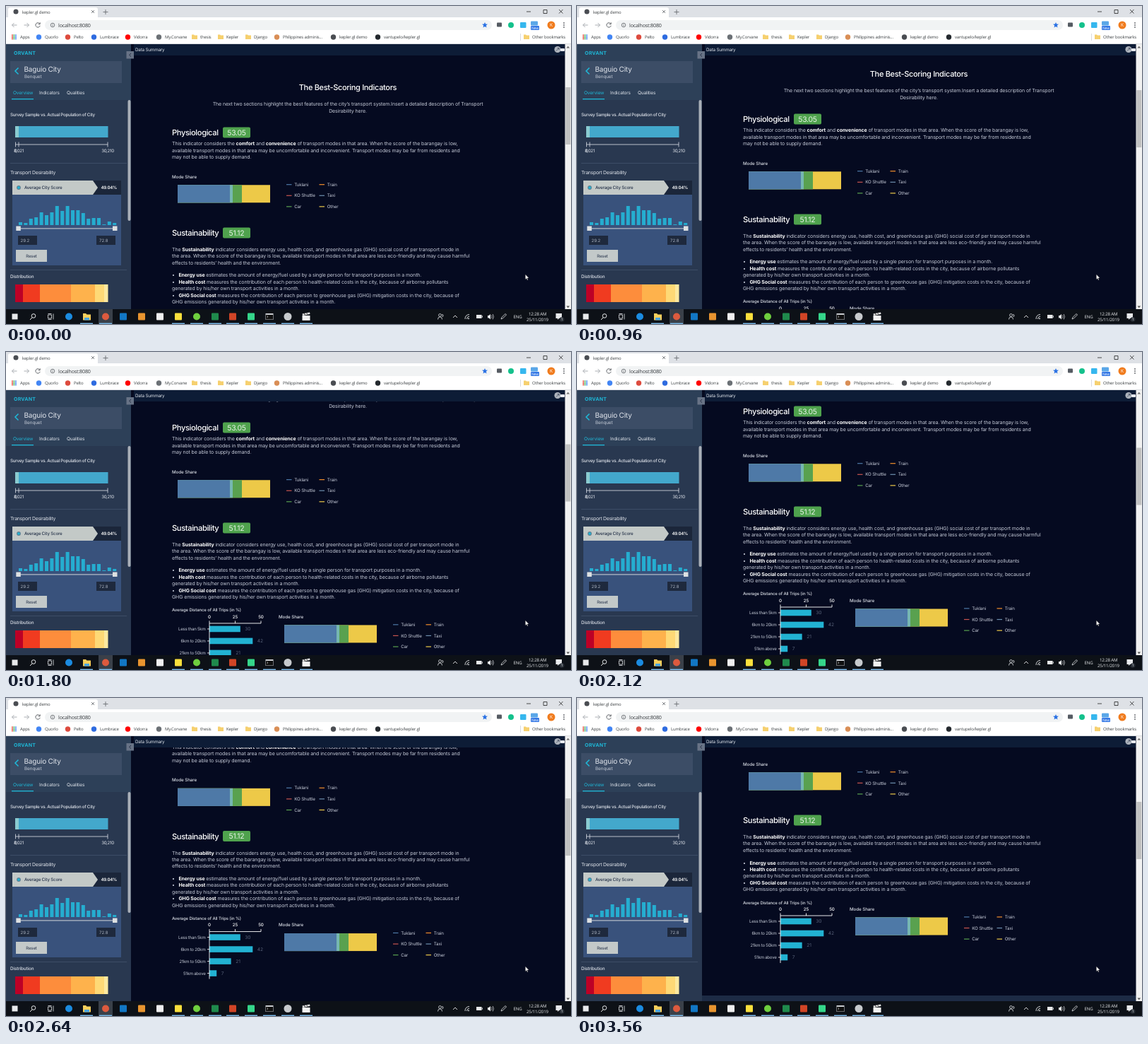
Animation of 800 by 450 pixels, one loop 3.6 s. Source, as an HTML page:

```html
<!DOCTYPE html>
<html lang="en">
<head>
<meta charset="utf-8">
<title>Transport dashboard</title>
<style>
@property --s { syntax: "<number>"; inherits: true; initial-value: 0; }
html, body { margin: 0; width: 100%; height: 100%; overflow: hidden; background: #fff; }
svg { display: block; }
#stage { width: 800px; height: 450px; animation: scroll 3600ms linear infinite; }
#page { transform: translateY(calc(var(--s) * -1px)); }
#thumb { transform: translateY(calc(var(--s) * .216px)); }
text { font-family: Inter, sans-serif; text-rendering: geometricPrecision; white-space: pre; }
.ui { font-family: "Open Sans", "Noto Sans", sans-serif; }
.b { font-weight: 700; fill: #fff; }
@keyframes scroll {
  0% { --s: 0; }
  26.67% { --s: 19; }
  31.1% { --s: 21.5; }
  37.78% { --s: 54.5; }
  50% { --s: 72; }
  66.67% { --s: 115; }
  83.33% { --s: 141; }
  93.3%, 100% { --s: 148; }
}
</style>
</head>
<body>
<svg id="stage" viewBox="0 0 800 450" xmlns="http://www.w3.org/2000/svg"></svg>
<script>
const rect = (x, y, w, h, fill, r = 0) =>
  `<rect x="${x}" y="${y}" width="${w}" height="${h}" fill="${fill}" rx="${r}"/>`;
const dot = (x, y, r, fill) => `<circle cx="${x}" cy="${y}" r="${r}" fill="${fill}"/>`;
const line = (d, color, w = 1) => `<path d="${d}" fill="none" stroke="${color}" stroke-width="${w}"/>`;
const shape = (d, fill) => `<path d="${d}" fill="${fill}"/>`;
const text = (x, y, str, size, fill, { ls = 0, wt = 400, at = 'start', cls = '' } = {}) =>
  `<text x="${x}" y="${y}" font-size="${size}" fill="${fill}" letter-spacing="${ls}" font-weight="${wt}" text-anchor="${at}" class="${cls}">${str}</text>`;
const ui = (x, y, str, fill = '#3c4043', size = 6, ls = -.15) => text(x, y, str, size, fill, { ls, cls: 'ui' });
const folder = (x, y, fill = '#f6d06f') => shape(`M${x - 4} ${y - 3}h3l1 1h4v5.500h-8z`, fill);

const BLUE = '#4e79a7', TEAL = '#76b7b2', GREEN = '#59a14f', YELLOW = '#edc948';
const CYAN = '#1fb6d6', PALE = '#dfe3ea';

function browser() {
  const dim = '#a9adb2', grey = '#5f6368';
  let s = rect(0, 0, 800, 16, '#dee1e6') + rect(3, 2, 127, 16, '#fff', 3) + rect(0, 16, 800, 38, '#fff')
    + dot(14, 8, 3.5, '#4a4d52') + ui(23, 10.5, 'kepler.gl demo')
    + line('M121 6l4 4m0-4l-4 4', grey, .8) + line('M141 5v7m-3.500-3.500h7', grey, .8)
    + line('M737 8h6', '#222', .8) + line('M761 5.500h5v5h-5z', '#222', .8) + line('M783 5l5.500 5.500m0-5.500l-5.500 5.500', '#222', .8);
  s += line('M15.500 27h-7m3-3l-3 3l3 3', dim) + line('M25.500 27h7m-3-3l3 3l-3 3', dim)
    + line('M47.800 25.200a3.200 3.200 0 1 0 .4 2.600m0-4.500v2.400h-2.400', grey)
    + rect(55, 20, 633, 14, '#f1f3f4', 7) + `<circle cx="66" cy="27" r="2.800" fill="none" stroke="${grey}" stroke-width=".8"/>`
    + line('M66 26.500v2m0-3.200v.6', grey, .8) + ui(74, 29.5, 'localhost:8080', '#303438', 7.1)
    + shape('M678 23l1.100 2.600 2.900.2-2.200 1.800.7 2.800-2.500-1.500-2.500 1.500.7-2.800-2.200-1.800 2.900-.2z', '#2b72e4')
    + rect(695, 23.5, 7, 6, '#555b62', 1) + dot(715, 27, 4, '#14c18c') + rect(728, 23, 8.5, 8, '#36b7ee', 1)
    + rect(743, 21.5, 10, 6, '#5aa7e8', 1) + rect(743, 28, 12, 6, '#3478e5', 1) + ui(744, 33, 'New', '#fff', 5)
    + dot(772, 27, 5.5, '#f07b1d') + text(772, 29.4, 'K', 6.5, '#fff', { at: 'middle', cls: 'ui' })
    + [24, 27, 30].map(y => dot(790, y, .9, grey)).join('');
  for (let i = 0; i < 9; i++)
    s += rect(8 + i % 3 * 2.5, 40.5 + (i / 3 | 0) * 2.5, 1.8, 1.8, ['#ea4335', '#34a853', '#4285f4'][i % 3]);
  const marks = [
    [20, 'Apps'], [55, 'Quorlo', '#4285f4'], [96, 'Pelto', '#dd4b3e'], [133, 'Lumbrace', '#2e6be0'],
    [181, 'Vidorra', '#f00'], [225, 'My.Corvane', '#6b7075'], [275, 'thesis', 0], [312, 'Kepler', 0],
    [351, 'Django', 0], [392, 'Philippines adminis...', '#d98e56'], [472, 'kepler.gl demo', '#4a4d52'],
    [535, 'vantupelo/kepler.gl', '#24292e'], [745, 'Other bookmarks', 0]
  ];
  for (const [x, name, color] of marks)
    s += ui(x, 46.2, name) + (color ? dot(x - 8.5, 44, 3.7, color) : color === 0 ? folder(x - 8, 43.5) : '');
  return s + line('M728.500 39v10', '#c9ccd0', .7) + rect(0, 53, 800, 1, '#dadce0');
}

function sidebar() {
  let s = rect(0, 54, 177, 79, '#2d4058') + rect(0, 133, 177, 296, '#293850')
    + text(11, 68.6, 'ORVANT', 7, CYAN, { wt: 700, ls: .25 })
    + rect(6, 78, 158, 31, '#3c4d66') + line('M17.500 87.500l-4.500 4.500l4.500 4.500', CYAN, 1.6)
    + text(25.5, 93, 'Baguio City', 10, PALE, { ls: -.2 }) + text(26, 102, 'Benquet', 6.4, '#c4cbd6', { ls: -.1 })
    + text(10, 124.7, 'Overview', 6.5, CYAN, { ls: -.1 }) + text(47, 124.7, 'Indicators', 6.5, PALE, { ls: -.15 })
    + text(86, 124.7, 'Qualities', 6.5, PALE, { ls: -.15 }) + rect(8, 131, 31, 1.3, CYAN)
    + rect(172.5, 133, 4, 171, '#a9afb8', 2)
    + text(6, 156.3, 'Survey Sample vs. Actual Population of City', 6.3, PALE, { ls: -.28, wt: 500 })
    + rect(13, 170, 5, 16, '#8acbd0') + rect(18, 170, 126.5, 16, '#43a8cc')
    + line('M13.500 192.500v7m4.500-7v7m126-7v7M13.500 196h130.500', PALE, .8);
  for (const [x, n] of [[13.5, '0'], [18, '8,021'], [144, '30,210']])
    s += text(x, 207.3, n, 6.2, PALE, { at: 'middle', ls: -.3 });
  s += rect(6, 222, 165, .8, '#43536c') + text(6, 238.3, 'Transport Desirability', 6.9, PALE, { ls: -.25 })
    + rect(9, 247, 154, 120, '#39527c') + rect(9, 247, 154, 20, '#1b263a')
    + shape('M9 247h114l7 10-7 10H9z', '#c3c9c7') + dot(18, 257, 2.9, '#5d7f93') + dot(18, 257, 1.8, CYAN)
    + text(26, 259.3, 'Average City Score', 6.2, '#26334a', { ls: -.18, wt: 500 })
    + text(157, 259.3, '49.04%', 6.1, '#fff', { at: 'end', ls: -.2, wt: 600 });
  const bins = [4, 3, 9, 11, 18, 14, 18, 27, 20, 27, 21, 21, 17, 9, 10, 10, 1, 5, 3];
  bins.forEach((h, i) => { s += rect(18 + i * 7.4, 310 - h, 5, h, '#25add0'); });
  s += rect(17, 314.3, 138, 1.2, '#b9c1cb') + rect(14.3, 311.5, 6.5, 6.5, '#dde0e2') + rect(151, 311.5, 6.5, 6.5, '#dde0e2')
    + rect(17, 325, 27, 13, '#1e293d') + rect(128, 325, 27, 13, '#1e293d')
    + text(20.5, 333.7, '29.2', 6, '#aab3c1') + text(132, 333.7, '72.8', 6, '#aab3c1')
    + rect(14, 345, 44, 17, '#c3c9c9') + text(36, 356, 'Reset', 6, '#26334a', { at: 'middle', ls: -.1 })
    + rect(6, 373, 165, .8, '#43536c') + text(6, 384.5, 'Distribution', 6.4, PALE, { ls: -.15, wt: 500 });
  const edges = [13, 24, 48, 92, 126, 139, 144.5];
  ['#bd0026', '#f03b20', '#fd8d3c', '#feb24c', '#fed976', '#fde9a0'].forEach((c, i) => {
    s += rect(edges[i], 394, edges[i + 1] - edges[i], 25, c);
  });
  return s;
}

// Stacked bar with its label and legend; x, y is the bar's top left corner.
function modeShare(x, y) {
  let s = text(x - 8, y - 9.6, 'Mode Share', 6.2, PALE, { ls: -.05, wt: 500 })
    + rect(x, y, 131, 25, YELLOW) + rect(x, y, 91, 25, GREEN) + rect(x, y, 78, 25, TEAL) + rect(x, y, 74, 25, BLUE);
  const keys = [['Tuklani', BLUE], ['Train', '#f28e2b'], ['KO Shuttle', '#c8554f'], ['Taxi', '#6d8fae'], ['Car', GREEN], ['Other', YELLOW]];
  keys.forEach(([name, color], i) => {
    const kx = x + 154 + i % 2 * 46.5, ky = y - .6 + (i / 2 | 0) * 15.6;
    s += rect(kx, ky - .6, 7.5, 1.2, color) + text(kx + 11.2, ky + 2.2, name, 6.2, '#c9cedb', { ls: -.12 });
  });
  return s;
}

function heading(y, name, score) {
  return text(235, y, name, 11.2, '#fff', { wt: 500, ls: -.4 }) + rect(307, y - 11.5, 39, 15, '#4fa24d', 2)
    + text(326.5, y - .2, score, 10.4, '#e6f2e6', { at: 'middle', ls: -.25 });
}

function content() {
  const para = (y, rows, x = 235, at = 'start') => rows.map((row, i) =>
    text(x, y + i * 9.45, row.replace(/\*(.+?)\*/g, '<tspan class="b">$1</tspan>'), 7, '#c6cbd8', { ls: -.11, at })).join('');
  let s = text(484, 119, 'The Best-Scoring Indicators', 11, '#fff', { at: 'middle', ls: -.33, wt: 500 })
    + para(141.4, ['The next two sections highlight the best features of the city’s transport system.Insert a detailed description of Transport',
      'Desirability here.'], 484, 'middle')
    + heading(183, 'Physiological', '53.05')
    + para(197.5, ['This indicator considers the *comfort* and *convenience* of transport modes in that area. When the score of the barangay is low,',
      'available transport modes in that area may be uncomfortable and inconvenient. Transport modes may be far from residents and',
      'may not be able to supply demand.'])
    + modeShare(243, 253.3)
    + heading(325, 'Sustainability', '51.12')
    + para(347, ['The *Sustainability* indicator considers energy use, health cost, and greenhouse gas (GHG) social cost of per transport mode in',
      'the area. When the score of the barangay is low, available transport modes in that area are less eco-friendly and may cause harmful',
      'effects to residents’ health and the environment.'])
    + para(383.5, ['•   *Energy use* estimates the amount of energy/fuel used by a single person for transport purposes in a month.',
      '•   *Health cost* measures the contribution of each person to health-related costs in the city, because of airborne pollutants',
      'generated by his/her own transport activities in a month.',
      '•   *GHG Social cost* measures the contribution of each person to greenhouse gas (GHG) mitigation costs in the city, because of',
      'GHG emissions generated by his/her own transport activities in a month.'])
    + text(235, 439.5, 'Average Distance of All Trips (in %)', 6, PALE, { ls: -.1, wt: 500 });
  [0, 25, 50].forEach(n => {
    s += text(288 + n * 1.46, 448.6, n, 6.2, '#fff', { at: 'middle', wt: 500 });
  });
  const trips = [['Less than 5km', 30], ['6km to 20km', 42], ['21km to 50km', 21], ['51km above', 7]];
  trips.forEach(([name, n], i) => {
    const y = 464 + i * 17;
    s += text(282.5, y + 2.2, name, 6.1, '#c2c8d4', { at: 'end', ls: -.25 }) + rect(288, y - 4.3, n * 1.46, 8.6, '#22b2d2')
      + text(294.5 + n * 1.46, y + 2.3, n, 6.6, '#59637a') + line(`M285 ${y}h3`, '#fff', .8);
  });
  return s + line('M288 452.500v3.500h73v-3.500m-36.500 0v3.500M288 456v67', '#fff', .9) + modeShare(394, 458.5)
    + rect(177, 569, 615, 20, '#1d2b45');
}

function panel() {
  return rect(177, 54, 615, 375, '#050a20') + rect(181, 54, 610, 16, '#0d1c36')
    + text(183, 64.3, 'Data Summary', 6.3, PALE, { ls: -.2 })
    + `<svg x="177" y="70" width="615" height="359" viewBox="177 70 615 359"><g id="page">${content()}</g></svg>`
    + dot(781, 61.5, 4.6, '#aeb4bd') + line('M779 63.500l4-4m-2.500 0h2.500v2.500', '#3b465a', .8) + rect(785, 60, 6, 4, '#e8eaf0', 1)
    + rect(170.5, 64, 10.5, 10.5, '#687386') + line('M177 67l-2.500 2.300l2.500 2.300', '#1d2940', .9)
    + rect(791.5, 54, 8.5, 375, '#f1f1f1') + shape('M793.500 59.500l2.300-2.800 2.300 2.800z', '#6a6a6a') + shape('M793.500 424.500l2.300 2.800 2.300-2.800z', '#505050')
    + `<g id="thumb">${rect(792.3, 115, 7, 81, '#c1c1c1')}</g>`;
}

function taskbar() {
  const w = '#e8eaec';
  let s = rect(0, 429, 800, 21, '#0d1117') + rect(131, 429, 20, 21, '#3a4049')
    + rect(8.5, 435.5, 8, 8, w) + `<circle cx="39" cy="438.500" r="2.800" fill="none" stroke="${w}"/>` + line('M37 441l-3 3', w)
    + line('M59.500 437h5v5h-5zM59.500 435.500h5m-5 8h5m2.500-8v8', w, .8);
  const apps = [[89, '#1b8be0', 1], [141, '#dd5a3e', 1], [166, '#1277c4'], [192, '#e8952f'], [218, '#f0f0f0'],
    [244, '#fbe03c'], [270, '#6fcf3e', 1], [296, '#1f8a4c'], [321, '#d14526'], [347, '#35d68a']];
  for (const [x, c, round] of apps) s += round ? dot(x, 439.5, 5, c) : rect(x - 5, 434.5, 10, 10, c, 1);
  s += shape('M109 435h4l1.500 1.500h5.500v8h-11z', '#f7cf5c') + rect(111, 441, 7, 3.5, '#4aa5e0')
    + rect(367.5, 435, 11, 9, '#c9ccd0') + rect(368, 437, 10, 6.5, '#101010') + line('M369.500 438.500l1.500 1.200l-1.500 1.200', '#fff', .6)
    + dot(399, 439.5, 5.5, '#c7cacd')
    + rect(419.5, 438, 11, 7, '#f3f3f3') + shape('M419.500 435.500l10.500-2 .5 2.500-10.500 2z', '#e6e6e6') + line('M422 435l1.500 2m2-2.700l1.500 2', '#222', .9);
  for (const x of [114, 141, 244, 270, 296, 321, 347, 373, 399, 425]) s += rect(x - 9, 448.6, 18, 1.4, '#79b9ea');
  s += `<circle cx="614.500" cy="437.500" r="1.900" fill="none" stroke="${w}" stroke-width=".8"/>` + line('M611.500 443.500q0-3.500 3-3.500t3 3.500m-.5-6.500q2-1 2 1t-1.500 1.500', w, .8)
    + line('M633 441l3-3l3 3', w, .9) + line('M650 443q0-6 6-6.500m-3.500 6.500q0-3.500 3.500-3.800', w, .9) + dot(655, 442.3, .9, w)
    + rect(666, 437, 7.5, 5, w) + rect(673.8, 438.3, 1, 2.4, w)
    + shape('M682 438h1.800l2.200-2v7.500l-2.200-2H682z', w) + line('M687.500 437.500q1.500 2.200 0 4.400m1.700-5.900q2.600 3.700 0 7.400', w, .7)
    + line('M701 443l1-2.500l5-5l1.500 1.500l-5 5z', w, .8)
    + ui(718.5, 441.8, 'ENG', w, 6.1) + ui(740, 437.5, '12:28 AM', w, 6.1) + ui(737, 446, '25/11/2019', w, 6.1)
    + shape('M778.500 435h8.500v7h-4l-2 2v-2h-2.500z', w) + dot(787, 443.5, 3.3, '#2c323a') + text(787, 445.4, '1', 5, w, { at: 'middle' });
  return s;
}

const cursor = '<path d="M735.300 379.800v7.200l1.700-1.500 1.100 2.500 1.100-.5-1.100-2.400h2.300z" fill="#fff" stroke="#111" stroke-width=".4"/>';
document.getElementById('stage').innerHTML = browser() + sidebar() + panel() + taskbar() + cursor;
</script>
</body>
</html>
```
